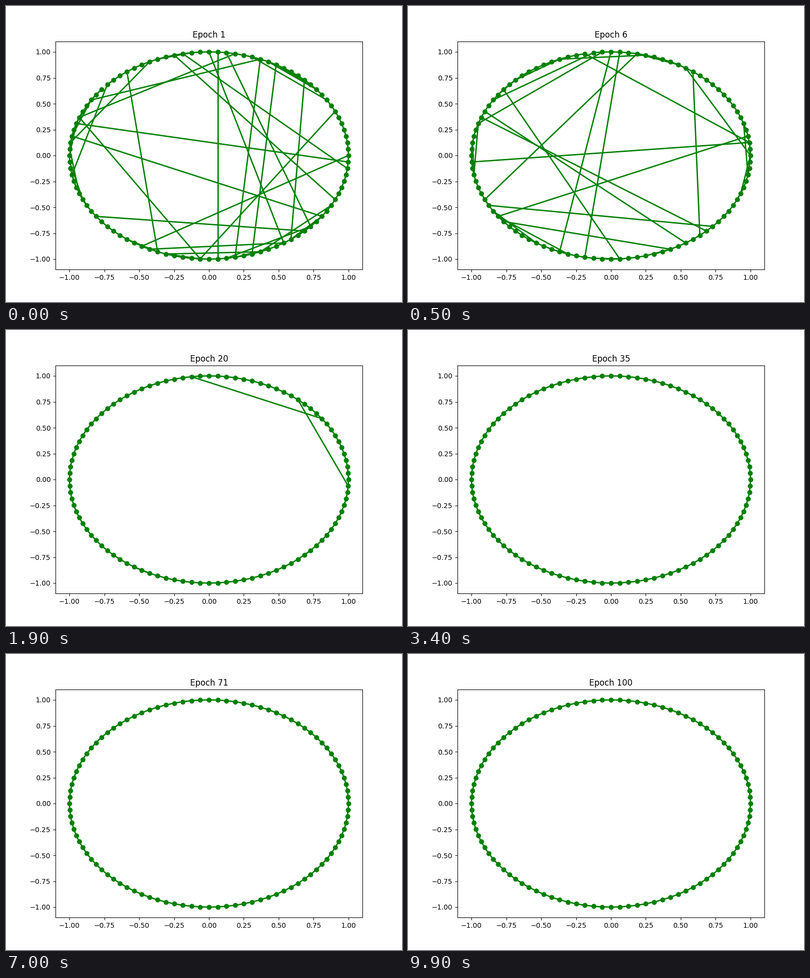
These frames come from a looping animation (800x600 px, 10 s). A matplotlib script:

```python
import random

import matplotlib.pyplot as plt
import numpy as np
from matplotlib.animation import FuncAnimation
from matplotlib.collections import LineCollection

N = 100
EPOCHS = 100
angle = 2 * np.pi * np.arange(N) / N
cities = np.column_stack([np.cos(angle), np.sin(angle)])

# Waves of long jumps: they appear between rise and peak,
# and drop out between hold and gone.
WAVES = [
    dict(rise=0, peak=0, hold=0, gone=4, jumps=[
        (24, 76), (25, 84), (23, 88), (29, 93), (28, 98), (47, 90),
        (45, 99), (44, 22), (41, 19), (17, 80), (19, 78), (13, 85),
        (7, 74), (0, 67), (44, 74), (60, 87), (35, 69)]),
    dict(rise=1, peak=5, hold=5, gone=9, jumps=[
        (25, 69), (24, 72), (28, 2), (15, 86), (22, 57), (26, 45),
        (39, 76), (43, 84), (44, 87), (58, 88), (51, 2), (3, 60), (61, 82)]),
    dict(rise=6, peak=10, hold=12, gone=20, jumps=[(52, 13), (55, 4)]),
    dict(rise=6, peak=10, hold=23, gone=32, jumps=[(27, 10), (14, 99)]),
]


def long_jumps(step):
    rng = random.Random(7)
    shown = []
    for wave in WAVES:
        for jump in wave["jumps"]:
            first = rng.randint(wave["rise"], wave["peak"])
            last = rng.randint(wave["hold"], wave["gone"])
            if first <= step <= last:
                shown.append(jump)
    return shown


def short_hops(step):
    """Seeded detours along the rim, fewer as the route settles."""
    rng = random.Random(step)
    count = round(26 / (1 + (step / 8) ** 3))
    hops = []
    for _ in range(count):
        start = rng.randrange(N)
        span = 2 + min(int(rng.expovariate(1 / 4)), 14)
        hops.append((start, (start + span) % N))
    return hops


def route(step):
    hops = short_hops(step)
    skipped = {start for start, _ in hops[::3]}
    ring = [(i, (i + 1) % N) for i in range(N) if i not in skipped]
    return ring + long_jumps(step) + hops


fig, ax = plt.subplots(figsize=(8, 6), dpi=100)
# Each city is the end of two links, so its marker is drawn twice
for _ in range(2):
    ax.plot(*cities.T, "go")
links = LineCollection([], colors="g", linewidths=2, capstyle="projecting")
ax.add_collection(links, autolim=False)
title = ax.set_title("Epoch 1")


def update(step):
    links.set_segments(cities[np.array(route(step))])
    title.set_text(f"Epoch {step + 1}")
    return links, title


anim = FuncAnimation(fig, update, frames=EPOCHS, interval=100,
                     repeat=True, repeat_delay=0, blit=False)
plt.show()
```
